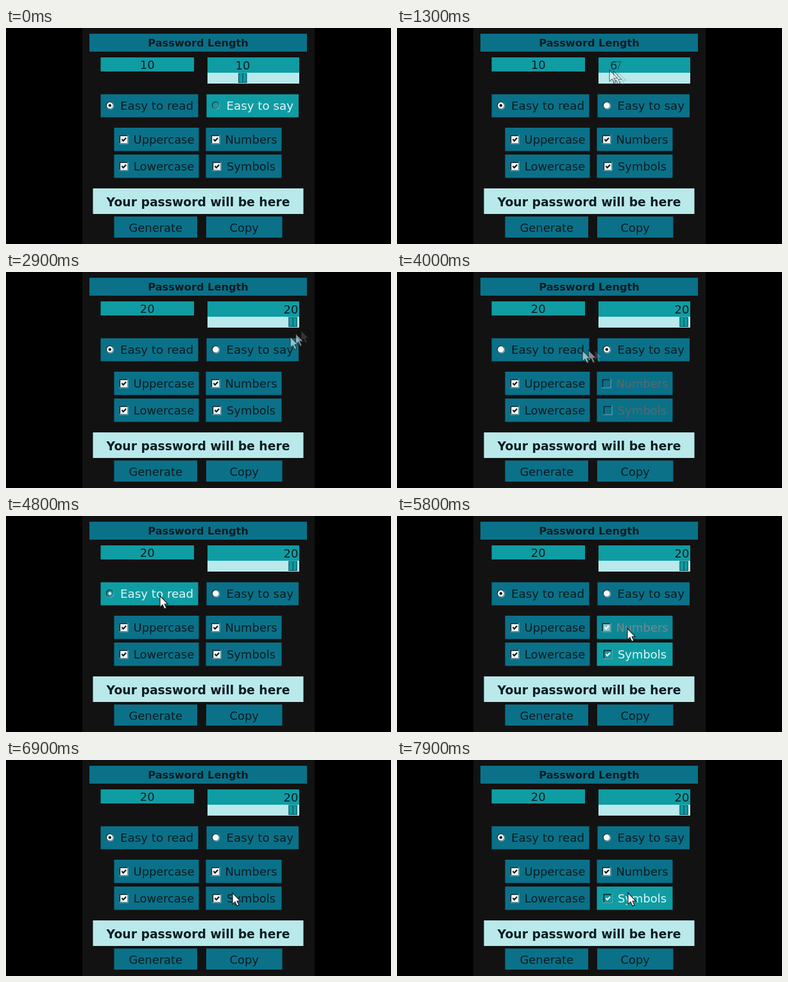
An HTML page that plays this animation: 600 by 338 pixels, repeating every 8 s.

```html
<!DOCTYPE html>
<html lang="en">
<head>
<meta charset="utf-8">
<title>Password generator</title>
<style>
  html, body { margin: 0; width: 100%; height: 100%; overflow: hidden; background: #000; }
  svg { display: block; width: 100vw; height: 100vh; }
  text { font: 17.9px "DejaVu Sans", Verdana, sans-serif; text-anchor: middle; fill: #0b1c21; }
  .title { font-weight: bold; font-size: 16.2px; }
  .result { font-weight: bold; font-size: 18.8px; }
  .choice { font-size: 18.3px; }
</style>
</head>
<body>
<svg id="stage" viewBox="0 0 600 338"></svg>
<script>
const LOOP = 8000, STEP = 100;
const BLUE = [10, 113, 137], TEAL = [16, 156, 163], LIGHT = [185, 233, 235];
const INK = [11, 28, 33], WHITE = [246, 250, 250], GREY = [92, 103, 108];
const HOVER_INK = [224, 245, 246];
const stage = document.getElementById('stage');

const rgb = c => `rgb(${c.map(Math.round).join()})`;
const mix = (a, b, k) => rgb(a.map((v, i) => v + (b[i] - v) * k));
const show = (el, on) => el.setAttribute('opacity', Number(on));

function add(tag, attrs, parent = stage) {
  const el = document.createElementNS('http://www.w3.org/2000/svg', tag);
  for (const key in attrs) el.setAttribute(key, attrs[key]);
  return parent.appendChild(el);
}
const box = (x, y, width, height, color, parent) =>
  add('rect', { x, y, width, height, fill: rgb(color) }, parent);

function label(str, x, y, style = '') {
  const el = add('text', { x, y, class: style });
  el.textContent = str;
  return el;
}

// A filled box with centred text
function panel(str, x, y, w, h, color, baseline, style) {
  const back = box(x, y, w, h, color);
  return { back, text: label(str, x + w / 2, y + baseline, style) };
}

box(119, 0, 362, 338, [18, 18, 18]);
panel('Password Length', 130, 9, 339, 28, BLUE, 20, 'title');
const spin = panel('', 147.5, 46, 145.5, 22, TEAL, 18).text;
panel('Your password will be here', 135.5, 251, 328, 40, LIGHT, 28, 'result');
panel('Generate', 168.5, 295, 129.5, 33, BLUE, 23.5);
panel('Copy', 312, 295, 118.5, 33, BLUE, 23.5);

// Slider
const SLIDER = { x: 314, y: 46, w: 143, h: 41 };
box(314, 46, 143, 24, TEAL);
box(314, 70, 143, 17, LIGHT);
const digits = [label('', 0, 65), label('', 0, 65)];
const thumb = add('g', {});
box(-7, 70.5, 13.5, 15.5, [7, 84, 98], thumb);
box(-5.8, 71.5, 11, 13.5, TEAL, thumb);
box(-.8, 71.5, 1.4, 13.5, [8, 90, 102], thumb);

// Options: an indicator on the left, text beside it
function radio(str, x, w) {
  const rect = { x, y: 103.7, w, h: 36 }, cx = x + 14.4, cy = 121.2;
  const back = box(x, rect.y, w, rect.h, BLUE);
  const text = label(str, x + w / 2 + 11.5, 128, 'choice');
  add('circle', { cx: cx + .4, cy: cy + .4, r: 6, fill: '#9fc4cc' });
  add('circle', { cx: cx - .3, cy: cy - .3, r: 5.9, fill: '#14323a' });
  const face = add('circle', { cx, cy, r: 4.9 });
  const mark = add('circle', { cx, cy, r: 2.2 });
  return { rect, back, text, face, mark, paint: 'fill' };
}
function check(str, x, y, w, indent) {
  const rect = { x, y, w, h: 36.5 }, bx = x + indent, by = y + 11.5;
  const back = box(x, y, w, rect.h, BLUE);
  const text = label(str, x + w / 2 + 11.5, y + 24.5);
  box(bx, by, 14, 14, [150, 196, 205]);
  box(bx, by, 13, 13, [8, 32, 38]);
  const face = box(bx + 1.7, by + 1.7, 11, 11, WHITE);
  const mark = add('path', {
    d: `M${bx + 4} ${by + 6.6}l2.3 2.6l4.3-4.8`, fill: 'none', 'stroke-width': 2.2
  });
  return { rect, back, text, face, mark, paint: 'stroke' };
}
const options = {
  read: radio('Easy to read', 147.5, 152),
  say: radio('Easy to say', 312.5, 143.5),
  upper: check('Uppercase', 168.5, 156, 132, 8),
  numbers: check('Numbers', 311.5, 156, 118, 8),
  lower: check('Lowercase', 168.5, 198, 132, 8),
  symbols: check('Symbols', 311.5, 198, 118, 10)
};

// Pointer moves: [start, end, x, y], at rest in between
const moves = [
  [500, 500, 400, 112],
  [500, 900, 363, 74],
  [1050, 1420, 316, 62],
  [1700, 2400, 443, 78],
  [2600, 2720, 468, 86],
  [2750, 3050, 418, 116],
  [3320, 4258, 240, 125],
  [4900, 5400, 357, 210],
  [5690, 5740, 359, 176],
  [6100, 6400, 353, 262],
  [6815, 6850, 353, 208],
  [7300, 7600, 360, 208]
];
function pointAt(t) {
  let [, , x, y] = moves[0];
  for (const [start, end, toX, toY] of moves.slice(1)) {
    const k = Math.max(0, Math.min(1, (t - start) / (end - start)));
    x += (toX - x) * k;
    y += (toY - y) * k;
  }
  return [x, y];
}
function isOver({ x, y, w, h }, t) {
  const [px, py] = pointAt(t);
  return px >= x && px <= x + w && py >= y && py <= y + h;
}
// Highlights trail the pointer and blend in
const hoverLevel = (rect, t) => isOver(rect, t - 100) ? 1 : isOver(rect, t - 70) ? .5 : 0;

// Oldest echo first, newest on top
const pointers = [.15, .5, .55].map(alpha => ({
  alpha,
  el: add('path', {
    d: 'M0 0V17.6L4 13.9L7 20.4L10 19.1L7.2 12.8H12.4Z',
    fill: '#fff', stroke: '#142126', 'stroke-width': 1.2
  })
}));

const valueAt = t => t < 1050 ? 10
  : Math.max(4, Math.min(20, Math.round(4 + (pointAt(Math.min(t, 2400))[0] - 315) / 7.8)));
const thumbX = v => 322 + (v - 4) * 7.83;

function drawSlider(t) {
  const values = [valueAt(t - 50), valueAt(t)];
  const same = values[0] === values[1];
  digits.forEach((el, i) => {
    el.textContent = values[i];
    el.setAttribute('x', Math.min(444, thumbX(values[i])));
    show(el, i ? (same ? 1 : .8) : (same ? 0 : .35));
  });
  thumb.setAttribute('transform', `translate(${thumbX(values[1])})`);
  show(thumb, !isOver(SLIDER, t));
  spin.textContent = t < 2500 ? 10 : 20;
}

function drawOptions(t) {
  const saying = t >= 3200 && t < 4400;
  for (const name in options) {
    const o = options[name];
    const level = hoverLevel(o.rect, t);
    const off = saying && (name === 'numbers' || name === 'symbols');
    const checked = name === 'say' ? saying : name === 'read' ? !saying : !off;
    o.back.setAttribute('fill', mix(BLUE, TEAL, level));
    o.text.style.fill = off ? rgb(GREY) : mix(INK, HOVER_INK, level);
    o.face.setAttribute('fill', off ? rgb(BLUE) : mix(WHITE, TEAL, level));
    o.mark.setAttribute(o.paint, mix(INK, WHITE, Math.min(1, level * 2)));
    show(o.mark, checked);
  }
}

function drawPointer(t) {
  const spots = [100, 50, 0].map(lag => pointAt(t - lag));
  const moved = Math.hypot(spots[1][0] - spots[2][0], spots[1][1] - spots[2][1]) > 2;
  pointers.forEach(({ el, alpha }, i) => {
    el.setAttribute('transform', `translate(${spots[i]})`);
    show(el, t < 500 ? 0 : moved ? alpha : i === 2);
  });
}

function render(now) {
  const t = Math.floor(now % LOOP / STEP) * STEP;
  drawSlider(t);
  drawOptions(t);
  drawPointer(t);
}

const start = performance.now();
function tick() {
  render(performance.now() - start);
  requestAnimationFrame(tick);
}
tick();
</script>
</body>
</html>
```
